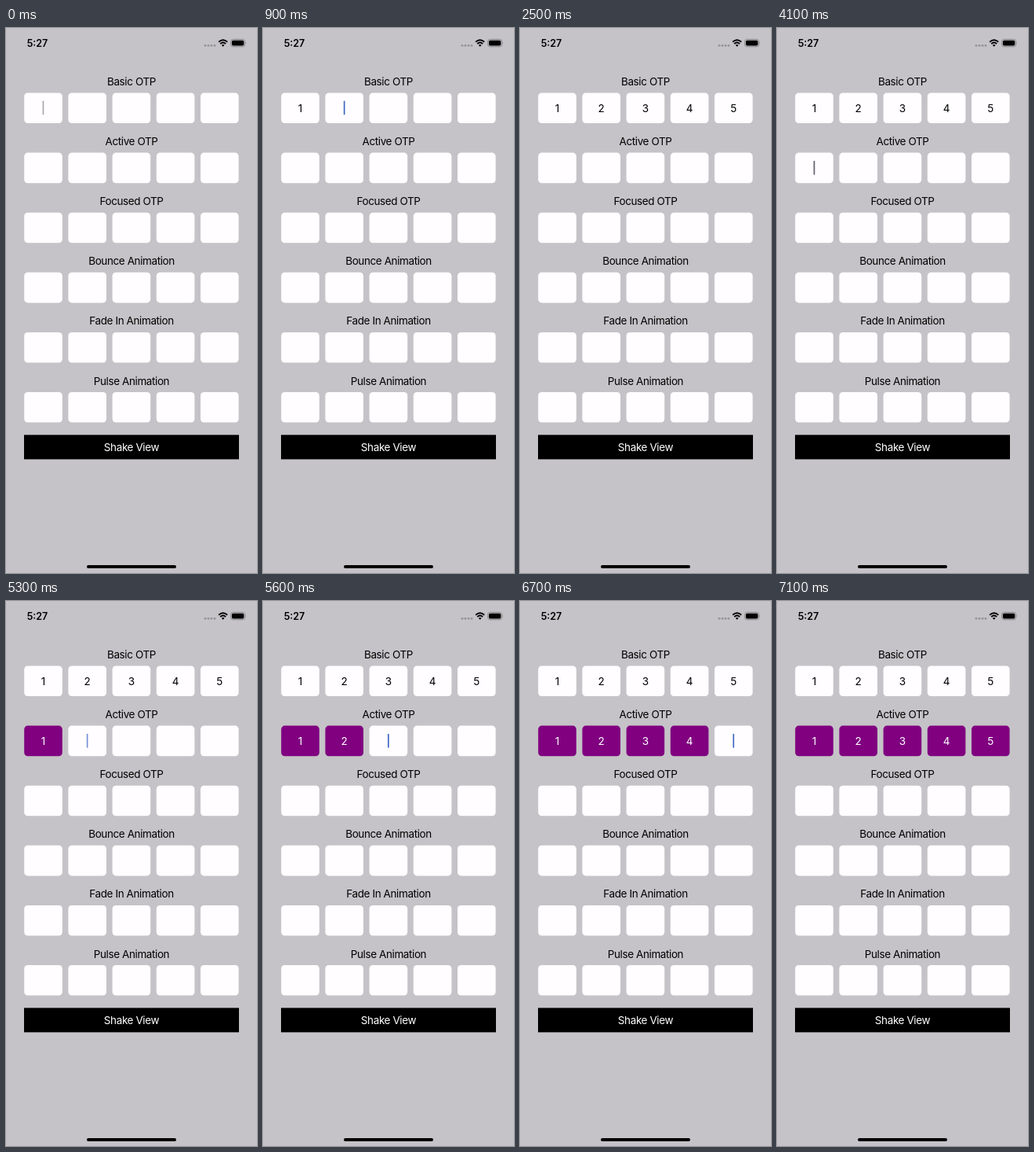
These frames come from a looping animation (320 by 693 pixels, 8 s). An HTML page:

```html
<!DOCTYPE html>
<html lang="en">
<head>
<meta charset="utf-8">
<title>OTP fields</title>
<style>
  html, body { margin: 0; width: 100%; height: 100%; overflow: hidden; background: #c5c3c7; }
  svg { display: block; width: 320px; height: 693px; }
  text { font: 400 13.5px Inter, "Open Sans", sans-serif; letter-spacing: -.4px; text-anchor: middle; }
  .clock { font-size: 12.5px; font-weight: 600; letter-spacing: 0; }
  .digit { letter-spacing: 0; }
  .box { fill: #fffdff; }
  .active .box { fill: #800080; }
  .active .digit { fill: #fff; }
</style>
</head>
<body>
<svg viewBox="0 0 320 693">
  <text class="clock" x="40" y="23.6">5:27</text>
  <g fill="#939196">
    <circle cx="254" cy="22.3" r="1.4"/><circle cx="258" cy="22.3" r="1.4"/>
    <circle cx="262" cy="22.3" r="1.4"/><circle cx="266" cy="22.3" r="1.4"/>
  </g>
  <g fill="none" stroke="#000" stroke-width="1.9">
    <path d="M271.2 17.8Q276.7 12.8 282.2 17.8M273.2 20.1Q276.7 17 280.2 20.1"/>
  </g>
  <path d="M274.8 21.7Q276.7 20.2 278.6 21.7L276.7 23.8Z"/>
  <rect x="286.6" y="14.4" width="18" height="9.4" rx="2.8" fill="none" stroke="#858388" stroke-width=".9"/>
  <rect x="287.9" y="15.7" width="15.4" height="6.8" rx="1.7"/>
  <path d="M305.6 17.6Q306.8 19.1 305.6 20.6Z" fill="#858388"/>
  <g id="rows"></g>
  <rect x="23" y="517.4" width="274" height="31"/>
  <text x="160" y="538" fill="#fff">Shake View</text>
  <rect id="caret" width="1.7" height="18" rx=".8"/>
  <rect x="103" y="683" width="114" height="4" rx="2"/>
</svg>
<script>
  const LOOP = 8000, PITCH = 56.2, ROW = 76.1;
  const BLUE = '#4168c4', DARK = '#60616b', GREY = '#aaa8ad';
  const titles = ['Basic OTP', 'Active OTP', 'Focused OTP',
    'Bounce Animation', 'Fade In Animation', 'Pulse Animation'];
  const entries = [
    { start: 0, keys: [900, 1200, 1600, 2100, 2500] },
    { start: 4100, keys: [4800, 5400, 5900, 6500, 7100] }
  ];
  const caret = document.getElementById('caret');

  function add(parent, tag, attrs, text = '') {
    const el = document.createElementNS('http://www.w3.org/2000/svg', tag);
    for (const name in attrs) el.setAttribute(name, attrs[name]);
    el.textContent = text;
    return parent.appendChild(el);
  }

  const cells = titles.map((title, r) => {
    const row = add(document.getElementById('rows'), 'g', { transform: `translate(0 ${r * ROW})` });
    add(row, 'text', { x: 160, y: 73 }, title);
    return [1, 2, 3, 4, 5].map((n, i) => {
      const cell = add(row, 'g', { transform: `translate(${23.2 + i * PITCH} 82.5)` });
      add(cell, 'rect', { class: 'box', width: 48.6, height: 38.6, rx: 4.5 });
      const digit = add(cell, 'text', { class: 'digit', x: 24.3, y: 24.4 }, n);
      return { cell, digit };
    });
  });

  function caretColor(r, count, t, since) {
    if (r === 0 && count === 0) {
      if (t < 100) return GREY;
      if (t < 300) return 'none';
      return t < 400 ? GREY : BLUE;
    }
    return count === 0 && since < 100 ? DARK : BLUE;
  }

  function draw(t) {
    caret.setAttribute('fill', 'none');
    cells.forEach((row, r) => {
      const { start, keys } = entries[r] || { start: LOOP, keys: [] };
      const count = keys.filter(k => t >= k).length;
      row.forEach(({ cell, digit }, i) => {
        digit.setAttribute('visibility', i < count ? 'visible' : 'hidden');
        cell.setAttribute('class', r === 1 && i < count ? 'active' : '');
      });
      if (t < start || count === keys.length) return;
      const since = t - (count ? keys[count - 1] : start);
      const fading = r === 1 && since >= (count ? 500 : 600);
      caret.setAttribute('x', 46.6 + count * PITCH);
      caret.setAttribute('y', 92.6 + r * ROW);
      caret.setAttribute('fill', caretColor(r, count, t, since));
      caret.setAttribute('opacity', fading ? .72 : 1);
    });
  }

  const begin = performance.now();
  function tick() {
    draw((performance.now() - begin) % LOOP);
    requestAnimationFrame(tick);
  }
  tick();
</script>
</body>
</html>
```
